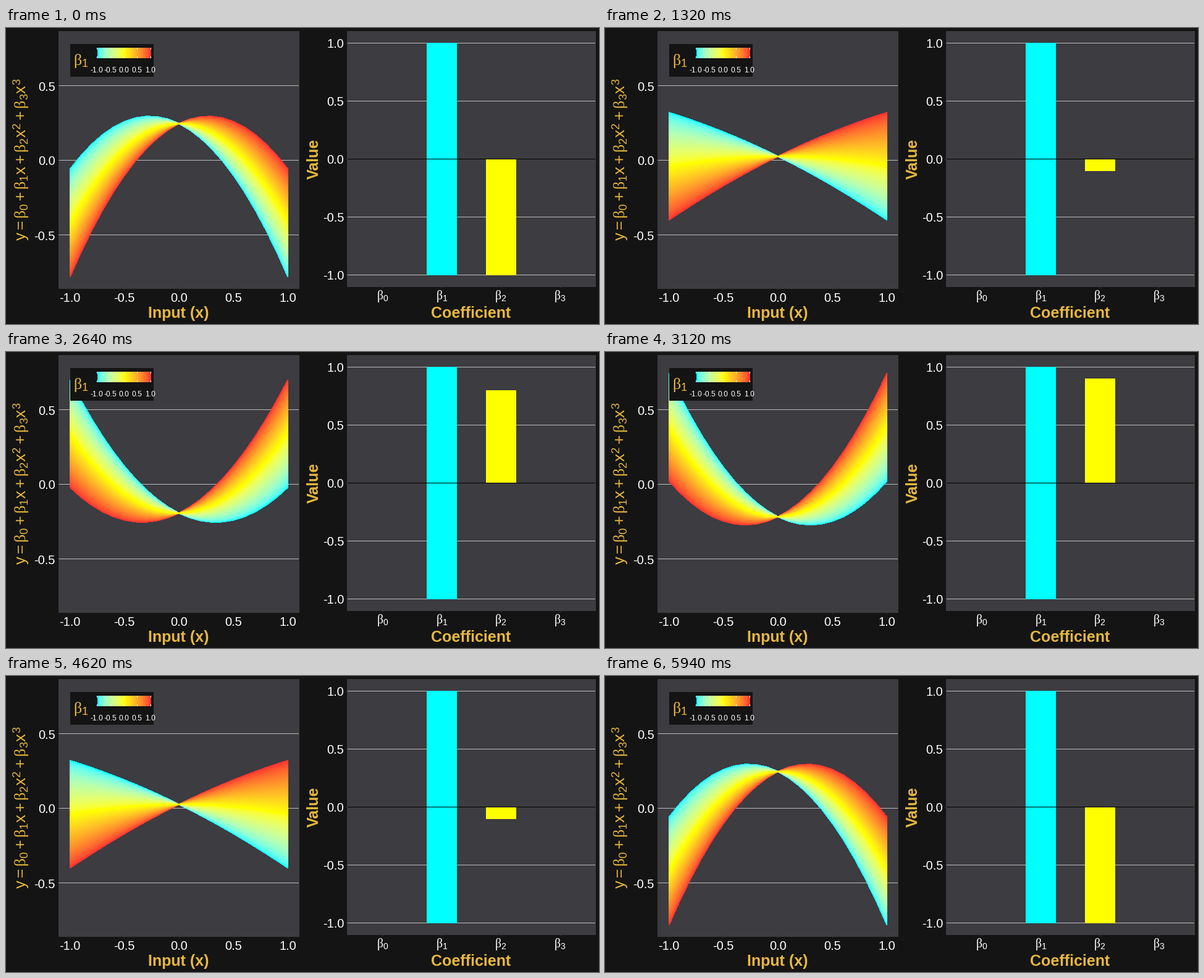
These frames come from a looping animation (960 by 480 pixels, 6000 ms). A matplotlib script:

```python
import numpy as np
import matplotlib.pyplot as plt
from matplotlib.animation import FuncAnimation
from matplotlib.collections import LineCollection
from matplotlib.patches import Rectangle

plt.rcParams.update({
    "font.family": "Liberation Sans",
    "mathtext.fontset": "custom",
    "mathtext.rm": "Liberation Sans",
    "mathtext.it": "Liberation Serif",
})

W, H, DPI = 960, 480, 96
PX = 72 / DPI  # points per pixel
FRAMES, INTERVAL = 100, 60
HALF = FRAMES // 2

BACK, PANEL, GRID, TICK = "#141414", "#3c3c41", "#bebebe", "#333333"
GOLD, WHITE = "#e8b83f", "#ffffff"

fig = plt.figure(figsize=(W / DPI, H / DPI), dpi=DPI, facecolor=BACK)
ax = fig.add_axes([0, 0, 1, 1])


def rect(x0, y0, x1, y1, color, z=1):
    patch = Rectangle((x0, y0), x1 - x0, y1 - y0, facecolor=color,
                      linewidth=0, zorder=z)
    return ax.add_patch(patch)


def label(x, y, s, size, color=WHITE, ha="center", z=6, **kw):
    ax.text(x, y, s, fontsize=size * PX, color=color, ha=ha, va="baseline",
            rotation_mode="anchor", zorder=z, **kw)


# Colour scale: cyan, yellow, red blended in CIE Lab
RGB_XYZ = np.array([[0.4124564, 0.3575761, 0.1804375],
                    [0.2126729, 0.7151522, 0.0721750],
                    [0.0193339, 0.1191920, 0.9503041]])
D65 = RGB_XYZ.sum(axis=1)


def to_lab(rgb):
    rgb = np.asarray(rgb, float)
    lin = np.where(rgb > 0.04045, ((rgb + 0.055) / 1.055) ** 2.4, rgb / 12.92)
    t = lin @ RGB_XYZ.T / D65
    f = np.where(t > 0.008856, np.cbrt(t), 7.787 * t + 16 / 116)
    x, y, z = f.T
    return np.stack([116 * y - 16, 500 * (x - y), 200 * (y - z)], axis=-1)


def to_rgb(lab):
    light, a, b = lab.T
    y = (light + 16) / 116
    f = np.stack([y + a / 500, y, y - b / 200], axis=-1)
    t = np.where(f > 0.2069, f ** 3, (f - 16 / 116) / 7.787)
    lin = np.clip(t * D65 @ np.linalg.inv(RGB_XYZ).T, 0, 1)
    return np.where(lin > 0.0031308, 1.055 * lin ** (1 / 2.4) - 0.055,
                    12.92 * lin)


def gradient(values):
    stops = to_lab([[0, 1, 1], [1, 1, 0], [1, 48 / 255, 48 / 255]])
    lab = [np.interp(values, [-1, 0, 1], channel) for channel in stops.T]
    return np.clip(to_rgb(np.stack(lab, axis=-1)), 0, 1)


# Orthogonal polynomial basis on a coarse grid
x = np.linspace(-1, 1, 21)
linear = x / np.linalg.norm(x)
quad = x ** 2 - np.mean(x ** 2)
quad /= np.linalg.norm(quad)

# Flattest lines are drawn last, so the crossing stays yellow
slopes = np.array(sorted(np.linspace(-1, 1, 201), key=abs, reverse=True))

# Left panel
rect(85, 5, 475, 423, PANEL)
for value, row in ((0.5, 93), (0.0, 214), (-0.5, 335)):
    rect(86, row, 474, row + 1, GRID, 2)
    rect(83, row, 85, row + 1, TICK)
    label(80, row + 8.5, f"{value:.1f}", 20, ha="right")
for value in (-1, -0.5, 0, 0.5, 1):
    col = round(279.7 + 176.5 * value)
    rect(col, 423, col + 1, 425, TICK)
    label(col, 444, f"{value:.1f}", 20)
label(279, 470, "Input (x)", 25, GOLD, weight="bold")
label(33, 213,
      r"$\mathrm{y} = \beta_0 + \beta_1\mathrm{x} + \beta_2\mathrm{x}^2"
      r" + \beta_3\mathrm{x}^3$", 26, GOLD, rotation=90)

fan_x = 280 + 176.3 * x
fan = LineCollection([], colors=gradient(slopes), linewidths=PX,
                     antialiaseds=False, zorder=3)
ax.add_collection(fan, autolim=False)

# Legend
rect(104, 26, 239, 79, BACK, 4)
label(109, 60, r"$\beta_1$", 26, GOLD, ha="left")
ax.imshow(gradient(np.linspace(-1, 1, 87))[None], extent=(148, 235, 49, 32),
          aspect="auto", interpolation="nearest", zorder=5)
for value in (-1, -0.5, 0, 0.5, 1):
    col = round(190.8 + 43.4 * value)
    rect(col, 32, col + 1, 35, WHITE, 6)
    rect(col, 46, col + 1, 49, WHITE, 6)
    label(col - 0.3, 72, f"{value:.1f}", 12)

# Right panel
rect(552, 5, 955, 420, PANEL)
for value in (1, 0.5, 0, -0.5, -1):
    row = int(212 - 188 * value)
    rect(553, row, 954, row + 1, GRID, 2)
    rect(550, row, 552, row + 1, TICK)
    label(547, row + 8.5, f"{value:.1f}", 20, ha="right")
for i in range(4):
    col = 609.5 + 95.8 * i
    rect(round(col), 420, round(col) + 1, 422, TICK)
    label(col, 440, rf"$\beta_{i}$", 20)
label(753, 470, "Coefficient", 25, GOLD, weight="bold")
label(506, 212.5, "Value", 25, GOLD, weight="bold", rotation=90)

rect(681, 24, 730, 401, "#00ffff", 3)
bar = rect(777, 212.5, 826, 212.5, "#ffff00", 3)
rect(553, 212, 954, 213, "#000000", 4)

ax.set_xlim(0, W)
ax.set_ylim(H, 0)
ax.axis("off")

# Curvature levels sit on whole frames; gaps are interpolated
levels = np.linspace(-1, 1, 41)
keys = np.round(np.arange(41) * (HALF - 1) / 40)


def update(frame):
    k = min(frame, FRAMES - 1 - frame)
    curve = np.interp(k, keys, levels)
    ys = 214 - 241.5 * (slopes[:, None] * linear + curve * quad)
    fan.set_segments([np.column_stack([fan_x, y]) for y in ys])
    bar.set_height(-188 * curve - 0.5 * np.sign(curve))
    return fan, bar


anim = FuncAnimation(fig, update, frames=FRAMES, interval=INTERVAL,
                     repeat=True, repeat_delay=0)
plt.show()
```
